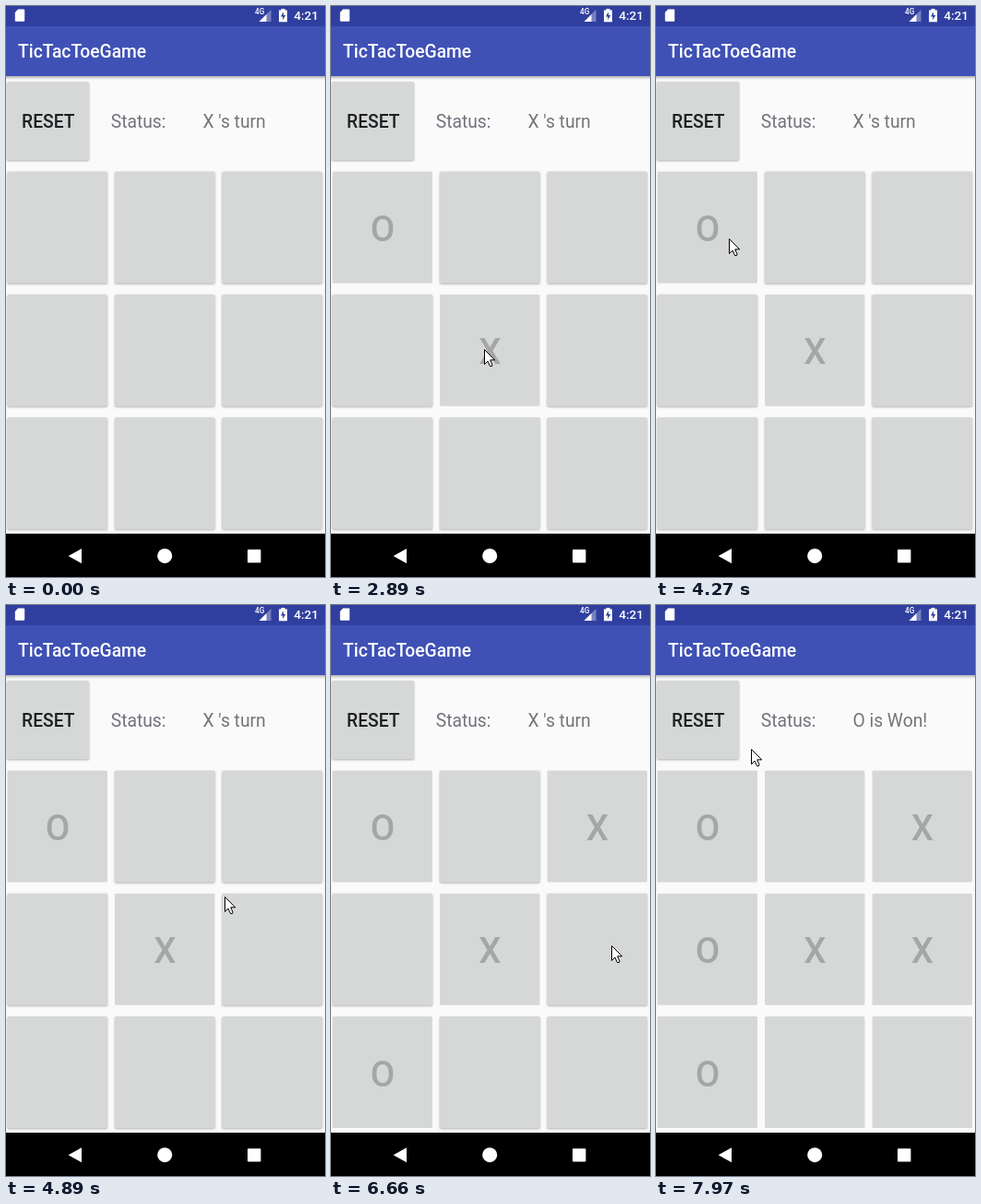
Animation of 346x619 px, one loop 8000 ms. Source, as an HTML page:

```html
<!DOCTYPE html>
<html lang="en">
<head>
<meta charset="utf-8">
<title>TicTacToeGame</title>
<style>
html, body { margin: 0; width: 100%; height: 100%; overflow: hidden; background: #fafafa; }
svg { display: block; width: 346px; height: 619px; font-family: Roboto, sans-serif; font-size: 19.3px; }
.medium { font-weight: 500; }
.button { fill: #d6d7d7; filter: drop-shadow(0 1px 1px rgba(0, 0, 0, .3)); }
.button.off { filter: none; }
.mark { fill: #a5a6a6; font-size: 38.4px; text-anchor: middle; }
</style>
</head>
<body>
<svg viewBox="0 0 346 619">
  <defs>
    <linearGradient id="shade" x2="0" y2="1">
      <stop stop-color="#000" stop-opacity=".28"/>
      <stop offset="1" stop-color="#000" stop-opacity="0"/>
    </linearGradient>
  </defs>
  <rect width="346" height="619" fill="#fafafa"/>
  <rect y="76" width="346" height="4" fill="url(#shade)"/>
  <rect y="22" width="346" height="54" fill="#3f51b5"/>
  <rect width="346" height="22" fill="#303f9f"/>

  <g fill="#fff">
    <path d="M13 3.5H19.2Q20.2 3.5 20.2 4.5V15.7Q20.2 16.7 19.2 16.7H10.8Q9.8 16.7 9.8 15.7V7Z"/>
    <text class="medium" x="270" y="9.3" font-size="8.2">4G</text>
    <path d="M287.5 4V17H274.5Z" opacity=".35"/>
    <path d="M282.5 9V17H274.5Z"/>
    <path d="M298.5 3H302.5V4.5H305V17.2H296V4.5H298.5Z"/>
    <path d="M301 6.3L298 11.4H300.2V15.2L303.2 10H301Z" fill="#303f9f"/>
    <text class="medium" x="339" y="15.4" font-size="13.6" text-anchor="end">4:21</text>
    <text class="medium" x="13" y="56">TicTacToeGame</text>
  </g>

  <rect class="button" x="1" y="82" width="89" height="85" rx="1.5"/>
  <text class="medium" x="45.8" y="132" fill="#1d1f22" text-anchor="middle">RESET</text>
  <text x="113.7" y="132" fill="#74727c">Status:</text>
  <text id="status" x="213.4" y="132" fill="#757575" xml:space="preserve"></text>

  <g id="board"></g>

  <rect y="572" width="346" height="47" fill="#000"/>
  <g fill="#fff">
    <path d="M67.6 596.2L82 588.2V604.2Z"/>
    <circle cx="172.2" cy="596.2" r="8"/>
    <rect x="262" y="589.2" width="14.4" height="14.4" rx=".8"/>
  </g>

  <circle id="ripple" r="33" fill="#000" opacity=".04"/>
  <path id="cursor" d="M.5 .5V16.5L4 13L6.5 18.5H8.5L9 17L6.7 11.8H11.7Z"
        fill="#fff" stroke="#000" stroke-linejoin="round"/>
</svg>
<script>
const LOOP = 8000, START = 420, STEP = 77.05;
const NS = 'http://www.w3.org/2000/svg';
const $ = id => document.getElementById(id);

// where the pointer glides: [leave, arrive, x, y]
const glides = [
  [START, START, 250, 552],
  [420, 960, 60, 190],
  [960, 1270, 161, 259],
  [1345, 1650, 166, 372],
  [3815, 4120, 63, 233],
  [4120, 4270, 79, 252],
  [4270, 4660, 158, 412],
  [4660, 5040, 280, 265],
  [5660, 5740, 263, 273],
  [5740, 6120, 100, 405],
  [6120, 6660, 304, 369],
  [7050, 7430, 275, 368],
  [7580, 7970, 103, 156]
];

// each click marks a cell and the computer answers
const moves = [
  { at: 2890, x: 4, o: 0, glow: 620 },
  { at: 5200, x: 2, o: 6, glow: 540 },
  { at: 7040, x: 5, o: 3, glow: 310 }
];
const won = moves[2].at;

const ease = k => k * k * (3 - 2 * k);

function add(tag, attrs) {
  const el = document.createElementNS(NS, tag);
  for (const key in attrs) el.setAttribute(key, attrs[key]);
  return $('board').appendChild(el);
}

const cells = Array.from({ length: 9 }, (_, i) => {
  const x = 1.5 + (i % 3) * 116.5, y = 179.5 + Math.floor(i / 3) * 133.3;
  return {
    box: add('rect', { class: 'button', x, y, width: 108.5, height: 121, rx: 1.5 }),
    mark: add('text', { class: 'mark medium', x: x + 54.4, y: y + 75.4 })
  };
});

function cursorAt(t) {
  const n = Math.floor((t - START + 10) / STEP);
  if (n < 0) return null;
  const now = START + n * STEP;
  let [, , x, y] = glides[0];
  for (const [leave, arrive, toX, toY] of glides.slice(1)) {
    const k = ease(Math.min(1, Math.max(0, (now - leave) / (arrive - leave))));
    x += (toX - x) * k;
    y += (toY - y) * k;
  }
  return [Math.round(x), Math.round(y)];
}

function place(el, pos) {
  el.style.display = pos ? '' : 'none';
  if (pos) el.setAttribute('transform', `translate(${pos})`);
}

function draw(t) {
  const played = moves.filter(m => t >= m.at);
  cells.forEach(({ box, mark }, i) => {
    mark.textContent = played.some(m => m.x === i) ? 'X' : played.some(m => m.o === i) ? 'O' : '';
    box.classList.toggle('off', t >= won || mark.textContent !== '');
  });
  $('status').textContent = t >= won ? 'O is Won!' : "X 's turn";
  const click = played.find(m => t >= m.at + STEP && t < m.at + m.glow);
  place($('ripple'), click && cursorAt(click.at));
  place($('cursor'), cursorAt(t));
}

const begin = performance.now();
function tick() {
  draw((performance.now() - begin) % LOOP);
  requestAnimationFrame(tick);
}
tick();
</script>
</body>
</html>
```
